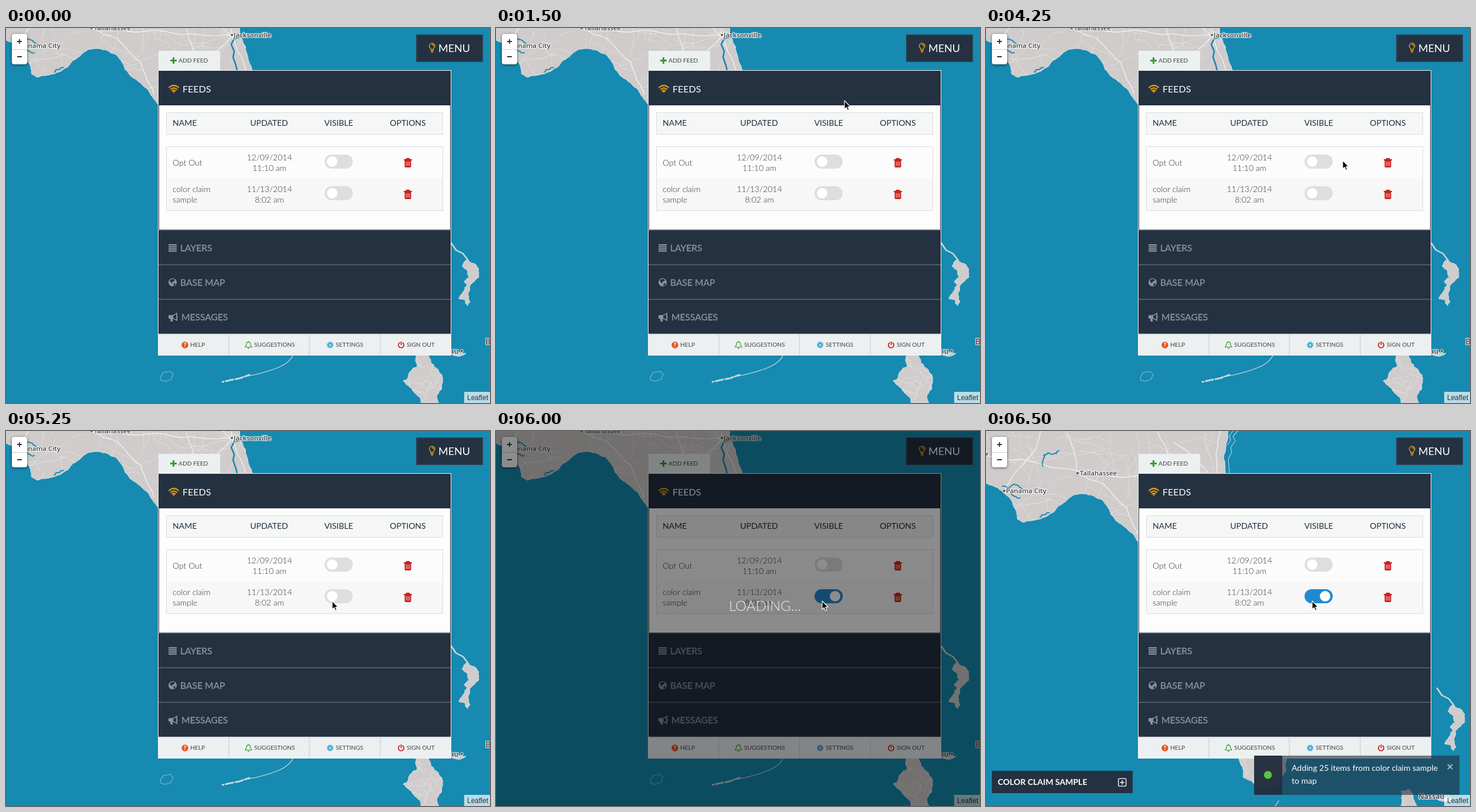
These frames come from a looping animation (825x640 px, 8 s). An HTML page:

```html
<!DOCTYPE html>
<html lang="en">
<head>
<meta charset="utf-8">
<title>Feeds panel over a map</title>
<style>
html, body { margin: 0; width: 100%; height: 100%; overflow: hidden; background: #168ab1; }
svg { display: block; width: 825px; height: 640px; }
text { font-family: Lato, "Open Sans", sans-serif; }
.label { font: 600 11.4px "Open Sans", "Noto Sans", sans-serif; fill: #444; stroke: #fff; stroke-opacity: .75; stroke-width: 2.5px; stroke-linejoin: round; paint-order: stroke; }
.mid { text-anchor: middle; }
.head { font-size: 14px; fill: #233040; }
.cell { font-size: 14px; font-weight: 300; fill: #333; }
.foot { font-size: 10.2px; fill: #444; }
.title { font-size: 16px; }
.navy { fill: #243141; }
.faded { font-size: 15.6px; fill: #8d949c; filter: blur(.5px); }
.faded text { stroke: #8d949c; stroke-width: .3px; }
.line { fill: none; stroke-linecap: round; stroke-linejoin: round; }

#map, #cursor, #knob, #late, #pin, #on, #dim, #load { animation: 8s step-end infinite; }
#map { animation-name: pan; }
#cursor { animation-name: point; }
#knob { animation-name: slide; }
#on { animation-name: toggle; }
#dim { animation-name: dim; }
#load { animation-name: load; }
#late, #pin { animation-name: late; }

@keyframes pan {
  0% { transform: translate(-10px, -72px); }
  78.125% { transform: translate(-1px, -10px); }
  81.25%, 100% { transform: none; }
}
@keyframes slide {
  0% { transform: none; }
  71.875% { transform: translateX(13px); }
  75%, 100% { transform: translateX(22px); }
}
@keyframes toggle { 0% { visibility: hidden; } 71.875%, 100% { visibility: visible; } }
@keyframes late { 0% { visibility: hidden; } 78.125%, 100% { visibility: visible; } }
@keyframes dim {
  0% { visibility: hidden; }
  71.875% { visibility: visible; }
  78.125%, 100% { visibility: hidden; }
}
@keyframes load {
  0% { opacity: 0; }
  71.875% { opacity: .45; }
  75% { opacity: .85; }
  78.125%, 100% { opacity: 0; }
}
@keyframes point {
  0% { transform: translate(-40px, -40px); }
  3.125% { transform: translate(707px, 0); }
  6.25% { transform: translate(730px, 37px); }
  9.375% { transform: translate(743px, 42px); }
  12.5% { transform: translate(754px, 50px); }
  15.625% { transform: translate(641px, 145px); }
  18.75% { transform: translate(593px, 123px); }
  21.875% { transform: translate(593px, 121px); }
  25% { transform: translate(594px, 122px); }
  31.25% { transform: translate(596px, 126px); }
  34.375% { transform: translate(597px, 131px); }
  37.5% { transform: translate(611px, 143px); }
  40.625% { transform: translate(661px, 194px); }
  43.75% { transform: translate(661px, 195px); }
  50% { transform: translate(624px, 221px); }
  53.125% { transform: translate(607px, 225px); }
  56.25% { transform: translate(593px, 233px); }
  59.375% { transform: translate(535px, 302px); }
  62.5% { transform: translate(545px, 290px); }
  65.625%, 100% { transform: translate(555px, 289px); }
}
</style>
</head>
<body>
<svg viewBox="0 0 825 640">
  <defs>
    <clipPath id="shore"><path id="shape"/></clipPath>
    <g id="trash" fill="none" stroke="#c9211e">
      <path d="M-7 -5H7M-2.500 -5V-7H2.500V-5" stroke-width="1.8"/>
      <path d="M-5.500 -4H5.500V6Q5.500 8 4 8H-4Q-5.500 8 -5.500 6Z" fill="#c9211e" stroke="none"/>
      <path d="M-2.7 -2V5.500M0 -2V5.500M2.7 -2V5.500" stroke="#f3cfce" stroke-width="1"/>
    </g>
  </defs>

  <rect width="825" height="640" fill="#168ab1"/>
  <g id="map">
    <path id="land" fill="#cfcccb" stroke="#dde3e5" stroke-width=".9"/>
    <g clip-path="url(#shore)">
      <path id="lanes" class="line" stroke="#e6e4e3" stroke-width=".7"/>
      <path id="roads" class="line" stroke="#f4f3f2" stroke-width="1.3"/>
      <path id="rivers" class="line" stroke="#168ab1" stroke-width="1.8"/>
      <path class="line" stroke="#168ab1" stroke-width="2.600" d="M408 88L399 90L394 100L399 112L397 122L402 136L405 150"/>
    </g>
    <path class="line" stroke="#a9cdda" stroke-width="1.2" d="M429 0L421 9L425 17L417 28L419 36L413 48L415 72M421 0L415 8L417 16L411 24"/>
    <path class="line" stroke="#c5d6db" stroke-width="1.3" d="M499 631Q492 645 470 653Q440 664 415 667"/>
    <path class="line" stroke="#c5d6db" stroke-width="3" stroke-dasharray="8 4 3 2" d="M425 664L408 670L392 673L379 676"/>
    <path class="line" stroke="#5faec8" stroke-width="1.6" d="M273 668L278 660L290 658L295 663L291 672L281 675L274 673Z"/>
    <path class="line" stroke="#cfd5d6" stroke-width="2.500" d="M769 439L777 451L789 457L798 469"/>
    <circle id="pin" cx="410" cy="82" r="6.5" fill="#3a44f2"/>
    <g fill="#444">
      <circle cx="31" cy="102" r="1.8"/><circle cx="156" cy="72" r="1.8"/>
      <circle cx="395" cy="84" r="1.8"/><circle cx="787" cy="623" r="2.4" stroke="#fff"/>
    </g>
    <text class="label" x="34" y="106">Panama City</text>
    <text class="label" x="160" y="76">Tallahassee</text>
    <text class="label" x="398" y="88">Jacksonville</text>
    <text class="label" x="737" y="628" style="font-size:12.5px">Nassau</text>
    <text class="label" x="827" y="612" style="font-size:14px;fill:#6b4a44">Bahamas</text>
    <text class="label" x="4" y="42" text-anchor="end">Crestview</text>
  </g>

  <!-- zoom control -->
  <rect x="10" y="10" width="26" height="52" rx="4" fill="#fff" style="filter:drop-shadow(0 1px 2px rgba(0,0,0,.6))"/>
  <path d="M10 36.5H36" stroke="#ccc"/>
  <path d="M19 23H27M23 19V27M19 49H27" stroke="#333" stroke-width="1.8"/>

  <!-- attribution -->
  <rect x="781" y="621" width="44" height="19" fill="#fff" opacity=".7"/>
  <text x="786" y="635" style="font:12px 'Liberation Sans',sans-serif" fill="#333">Leaflet</text>

  <!-- menu button -->
  <rect x="700" y="12" width="112" height="45" fill="#243141" stroke="#2c3e50" stroke-width="2"/>
  <g class="line" stroke="#dc9e12" stroke-width="1.5">
    <path d="M724.2 37V35.5Q721.5 33 721.5 30.8A4.7 4.7 0 0 1 731 30.8Q731 33 728.3 35.5V37Z"/>
    <path d="M724.3 39H728.2M725 41.3H727.5M726.3 28.3Q728.5 28.5 728.7 30.5"/>
  </g>
  <text x="737" y="41" font-size="18" fill="#fff">MENU</text>

  <!-- add feed tab -->
  <rect x="260" y="39" width="105" height="35" fill="#ecf0f1"/>
  <path d="M280 55.5H291M285.5 50V61" stroke="#3b9a31" stroke-width="3"/>
  <text class="foot" x="294" y="59">ADD FEED</text>

  <!-- panel: light outline, navy frame, white body -->
  <rect x="259" y="72" width="500" height="487" fill="#eef1f2"/>
  <rect class="navy" x="260" y="73" width="498" height="449"/>
  <rect x="261" y="132" width="496" height="212" fill="#fdfdfd"/>
  <g class="line" stroke="#d99a12" stroke-width="2.2" stroke-linecap="butt">
    <path d="M278 101.5Q286 94.5 294 101.5M280.8 104.6Q286 100 291.2 104.6M283.4 107.3Q286 105.2 288.6 107.3"/>
  </g>
  <circle cx="286" cy="109" r="1.5" fill="#d99a12"/>
  <text class="title" x="301" y="110" fill="#fff">FEEDS</text>

  <rect x="273.5" y="144.5" width="471" height="37" fill="#f5f6f6" stroke="#dcdcdc"/>
  <text class="head" x="284" y="167">NAME</text>
  <g class="head mid">
    <text x="448.5" y="167">UPDATED</text>
    <text x="567" y="167">VISIBLE</text>
    <text x="685" y="167">OPTIONS</text>
  </g>
  <rect x="273.5" y="202.5" width="471" height="109" fill="#fcfcfc" stroke="#dcdcdc"/>
  <rect x="274" y="257" width="470" height="54" fill="#f7f7f7"/>
  <g class="cell">
    <text x="284" y="235">Opt Out</text>
    <text x="284" y="280">color claim</text>
    <text x="284" y="298">sample</text>
    <g class="mid">
      <text x="449" y="226">12/09/2014</text>
      <text x="449" y="244">11:10 am</text>
      <text x="449" y="280">11/13/2014</text>
      <text x="449" y="298">8:02 am</text>
    </g>
  </g>
  <rect x="543" y="216" width="48" height="24" rx="12" fill="#dedede"/>
  <circle cx="556" cy="228" r="9" fill="#fff"/>
  <rect x="543" y="270" width="48" height="24" rx="12" fill="#dedede"/>
  <rect id="on" x="543" y="270" width="48" height="24" rx="12" fill="#2189d0"/>
  <circle id="knob" cx="556" cy="282" r="9" fill="#fff"/>
  <use href="#trash" x="685" y="230"/>
  <use href="#trash" x="685" y="284"/>

  <path d="M260 345H758M260 404H758M260 463H758" stroke="#5d6874" stroke-width="1.3"/>
  <g class="faded">
    <path d="M277 370.2H291M277 373.7H291M277 377.2H291M277 380.7H291" stroke="#8d949c" stroke-width="2.200"/>
    <text x="297" y="381">LAYERS</text>
    <circle cx="284" cy="434" r="7"/>
    <path class="navy" d="M281 429L286 428L288 431L284 433L283 436L279 432ZM286 436L289 435L288 439L285 440Z"/>
    <text x="297" y="440">BASE MAP</text>
    <path d="M277 491Q277 490 278 490H283Q288 489 291 486H292V492Q294 493 292 495V500H291Q288 497 284 496.5Q283 499 285 501H281Q280 499 280 496H278Q277 496 277 495Z"/>
    <path class="navy" d="M285 491Q288 490 290.3 488.5V497.5Q288 496 285 495Z"/>
    <text x="299" y="499">MESSAGES</text>
  </g>

  <rect x="260" y="522" width="498" height="36" fill="#ecf0f1"/>
  <path d="M260 522.5H758M380 523V558M517 523V558M638 523V558" stroke="#d5d9db" stroke-width="1.6"/>
  <circle cx="305" cy="541" r="5.7" fill="#e8541f"/>
  <text class="mid" x="305" y="544.4" font-size="9.5" font-weight="900" fill="#fff">?</text>
  <g class="line" stroke-width="1.2">
    <path stroke="#3b9a31" d="M407.5 544.5Q410 542 410 539Q410 535.8 413.3 535.8Q416.600 535.8 416.600 539Q416.600 542 419 544.5ZM413.3 535.5V534.700M412 546.3Q413.3 547.5 414.600 546.3"/>
    <circle stroke="#45afd8" stroke-width="3" cx="552.5" cy="541" r="3"/>
    <circle stroke="#45afd8" stroke-width="1.8" stroke-linecap="butt" stroke-dasharray="2 1.77" cx="552.5" cy="541" r="4.8"/>
    <path stroke="#c9211e" stroke-width="1.7" d="M670.800 537.2A4.700 4.700 0 1 0 676.200 537.2M673.5 535.5V540.5"/>
  </g>
  <g class="foot">
    <text x="314" y="544">HELP</text>
    <text x="423" y="544">SUGGESTIONS</text>
    <text x="562" y="544">SETTINGS</text>
    <text x="683" y="544">SIGN OUT</text>
  </g>

  <!-- layer bar and notice -->
  <g id="late">
    <rect class="navy" x="10" y="580" width="240" height="38"/>
    <text x="20" y="604" font-size="14" font-weight="700" fill="#fff">COLOR CLAIM SAMPLE</text>
    <rect x="225.700" y="593.2" width="13" height="13" rx="2" fill="none" stroke="#fff" stroke-width="1.3"/>
    <path d="M228.500 599.7H236M232.2 596V603.5" stroke="#fff" stroke-width="1.4"/>
    <rect x="457" y="554" width="350" height="67" fill="#232f3e" opacity=".62"/>
    <rect x="457" y="554" width="48" height="67" fill="#232f3e" opacity=".93"/>
    <circle cx="480.5" cy="587" r="6.7" fill="#5bc741"/>
    <g font-size="14" fill="#fff">
      <text x="521" y="580">Adding 25 items from color claim sample</text>
      <text x="521" y="602">to map</text>
    </g>
    <path d="M787 569L795 577M795 569L787 577" stroke="#9fb0ba" stroke-width="2.2"/>
  </g>

  <rect id="dim" width="825" height="640" fill="#000" opacity=".45"/>
  <text id="load" x="397" y="307" font-size="24" font-weight="300" fill="#fff">LOADING...</text>

  <g id="cursor">
    <path d="M1 1V15.500L4.300 12.400L6.500 17.500L8.800 16.500L6.700 11.500H11Z" fill="#000" stroke="#fff" stroke-width="1.100" stroke-linejoin="round"/>
  </g>
</svg>
<script>
let seed = 11;
const rand = () => (seed = (seed * 16807) % 2147483647) / 2147483647;
const jitter = n => (rand() - .5) * 2 * n;
const parse = s => s.split(' ').map(p => p.split(',').map(Number));
const toPath = pts => 'M' + pts.map(p => p.map(v => v.toFixed(1)).join(' ')).join('L');
const set = (id, d) => document.getElementById(id).setAttribute('d', d);

// Midpoint displacement turns a few points into a ragged line.
function ragged(text, amount, rounds = 3) {
  let pts = parse(text);
  for (let i = 0; i < rounds; i++) {
    pts = pts.flatMap((p, k) => {
      const q = pts[k + 1];
      if (!q) return [p];
      const dx = q[0] - p[0], dy = q[1] - p[1], j = jitter(amount);
      return [p, [(p[0] + q[0]) / 2 - dy * j, (p[1] + q[1]) / 2 + dx * j]];
    });
  }
  return toPath(pts);
}

const mainland = '-20,80 0,89 20,97 33,108 45,122 52,138 54,151 64,156 88,151 103,146 116,138 125,127 139,117 150,109 166,107 184,111 198,118 206,128 213,143 222,154 232,160 250,175 260,190 269,202 320,300 400,500 424,550 433,566 439,580 438,591 452,597 460,608 478,612 497,603 511,580 515,550 500,350 430,144 421,117 413,92 408,72 405,45 409,22 410,-20 -20,-20';
const islands = [
  '708,614 722,612 730,630 736,645 747,655 754,674 751,690 745,698 752,720 720,720 710,698 702,688 687,675 696,667 699,658 711,649 708,638 708,614',
  '787,478 795,468 808,474 816,483 816,497 806,506 800,514 801,540 797,546 792,536 782,534 790,521 796,510 791,505 800,497 797,488 787,478',
  '768,628 780,624 794,627 784,632 768,628'
];
const shape = ragged(mainland, .08) + 'Z' + islands.map(s => ragged(s, .16) + 'Z').join('');
set('land', shape);
set('shape', shape);

function walk(x, y, angle, steps, size, bend) {
  const pts = [[x, y]];
  for (let i = 0; i < steps; i++) {
    angle += jitter(bend);
    pts.push([x += Math.cos(angle) * size, y += Math.sin(angle) * size]);
  }
  return toPath(pts);
}
let lanes = '';
for (let i = 0; i < 95; i++) lanes += walk(rand() * 430, rand() * 195, rand() * 6.28, 10, 7, .35);
for (let i = 0; i < 50; i++) lanes += walk(690 + rand() * 62, 635 + rand() * 75, rand() * 6.28, 5, 4, .8);
for (let i = 0; i < 8; i++) lanes += walk(430 + rand() * 25, 560 + rand() * 40, rand() * 6.28, 5, 7, .4);
for (let i = 0; i < 9; i++) lanes += walk(395, 85, i * .7, 9, 9, .15);
set('lanes', lanes);

set('roads', [
  '-5,42 60,48 110,62 156,68 220,78 300,82 395,85',
  '395,85 404,110 420,150', '395,85 392,40 400,-5',
  '290,-5 312,50 322,90 345,150', '395,85 370,110 345,150',
  '156,72 150,35 135,-5', '156,72 200,90 240,130 262,185',
  '31,102 50,70 85,30 95,-5', '395,85 360,50 320,20'
].map(s => ragged(s, .06)).join(''));

set('rivers', [
  '28,94 40,97 52,92 62,99', '42,106 50,112 58,114',
  '98,42 106,37 113,40 124,33', '100,40 97,60', '92,147 100,143 108,139'
].map(s => ragged(s, .25)).join(''));
</script>
</body>
</html>
```
